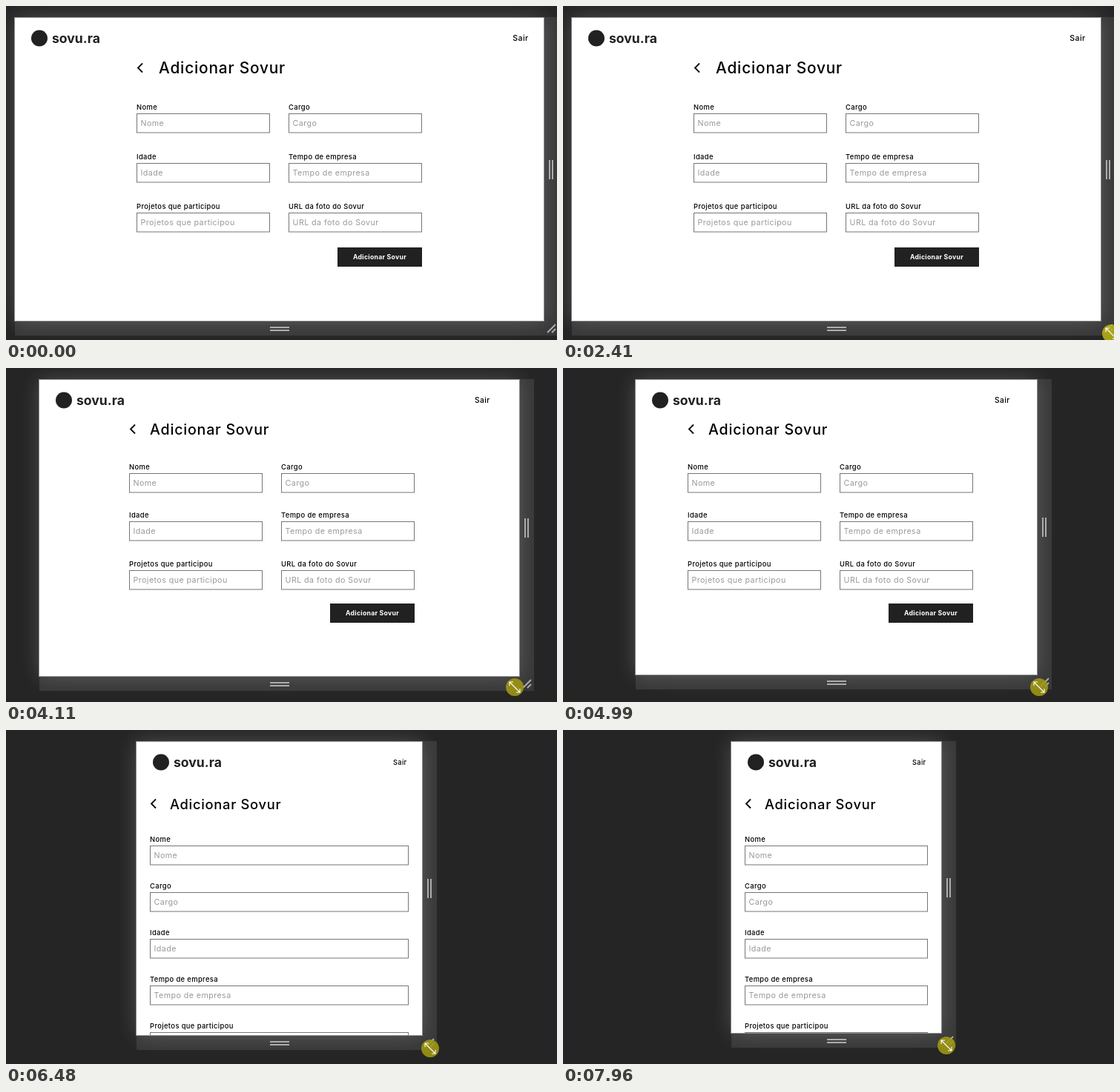
An HTML page that plays this animation: 743x451 px, repeating every 8 s.

```html
<!DOCTYPE html>
<html lang="pt-BR">
<head>
<meta charset="utf-8">
<title>Formulário responsivo</title>
<style>
  html, body { margin: 0; width: 100%; height: 100%; overflow: hidden; background: #252525; }
  #stage { position: relative; width: 743px; height: 451px; overflow: hidden; }
  #stage > * { position: absolute; }
  #page {
    top: 16px; background: #fff; overflow: hidden;
    box-shadow: 0 0 0 1px #8c8c8c, 0 0 26px rgba(255, 255, 255, .2);
  }
  #page svg { margin-top: -1px; }
  .bar { background: rgba(255, 255, 255, .085); }
  #right { top: 15px; width: 20px; }
  #bottom { height: 20px; }
  svg { display: block; overflow: visible; }
  #overlay { left: 0; top: 0; }
  text { font-family: Inter, "Open Sans", sans-serif; fill: #000; letter-spacing: .04em; }
  .brand { font-size: 17.6px; font-weight: 700; fill: #212121; letter-spacing: 0; }
  .title, .exit { font-weight: 500; }
  .label { font-size: 9.4px; font-weight: 500; }
  .hint { font-size: 10.7px; fill: #999; }
  .action { font-size: 8.7px; font-weight: 700; fill: #fff; text-anchor: middle; letter-spacing: .03em; }
  .box { fill: #fff; stroke: #767676; }
  .grip { stroke: #acacac; stroke-width: 2; fill: none; }
</style>
</head>
<body>
<div id="stage">
  <div id="right" class="bar"></div>
  <div id="bottom" class="bar"></div>
  <div id="page"></div>
  <svg id="overlay" width="743" height="451"></svg>
</div>
<script>
const LOOP = 8000, STEP = 78, CENTER = 368.5, TOP = 15;
const FORM = 385, FIELD = 180;

// time, page left, page bottom, pointer x, pointer y
const DRAG = [
  [2800, 12, 425, 739, 442],
  [3660, 25, 420, 714, 435],
  [4110, 45, 416, 686, 431],
  [4510, 77, 415, 663, 431],
  [4990, 98, 414, 642, 431],
  [5370, 124, 414, 616, 431],
  [5860, 149, 414, 590, 431],
  [6250, 170, 413, 578, 431],
  [7100, 205, 410, 544, 427],
  [7180, 205, 410, 544, 427],
  [7960, 227, 409, 517, 426]
];

// start time and pointer place before the drag; no place means hidden
const HOVER = [
  [0], [590, 742, 444], [680, 737, 437], [770],
  [1320, 749, 447], [1400, 745, 442], [1475, 743, 441], [1550],
  [2410, 739, 442]
];

const LAYOUTS = [
  { min: 666, scrollbar: 0, title: 20.8, base: 76, indent: 30, first: 130.5, pitch: 67, exit: 10.6 },
  { min: 600, scrollbar: 19, title: 19.6, base: 75, indent: 28, first: 127, pitch: 65.5, exit: 10.2 },
  { min: 499, scrollbar: 16, title: 19.6, base: 75, indent: 28, first: 127, pitch: 65.5, exit: 10.2 },
  { min: 416, scrollbar: 16, title: 18.3, base: 74, indent: 27, first: 122.9, pitch: 63, exit: 9.2 },
  { min: 0, scrollbar: 0, title: 18.3, base: 92, indent: 27, first: 141, pitch: 63, exit: 9.2, single: true }
];

const $ = id => document.getElementById(id);
const set = (el, attrs) => { for (const k in attrs) el.setAttribute(k, attrs[k]); };
function add(parent, tag, attrs, text) {
  const el = document.createElementNS('http://www.w3.org/2000/svg', tag);
  set(el, attrs);
  if (text) el.textContent = text;
  return parent.appendChild(el);
}
const move = (el, x, y) => el.setAttribute('transform', `translate(${x} ${y})`);

const view = add($('page'), 'svg', { width: 743, height: 451 });
add(view, 'circle', { cx: 33, cy: 28.5, r: 11, fill: '#212121' });
add(view, 'text', { class: 'brand', x: 50, y: 35 }, 'sovu.ra');
const exit = add(view, 'text', { class: 'exit', y: 32, 'text-anchor': 'end' }, 'Sair');
const back = add(view, 'path', { d: 'M8-6L2 0 8 6', fill: 'none', stroke: '#000', 'stroke-width': 1.8 });
const title = add(view, 'text', { class: 'title' }, 'Adicionar Sovur');

const fields = ['Nome', 'Cargo', 'Idade', 'Tempo de empresa', 'Projetos que participou', 'URL da foto do Sovur']
  .map(name => {
    const group = add(view, 'g', {});
    const box = add(group, 'rect', { class: 'box', x: .5, y: .5, height: 25.5 });
    add(group, 'text', { class: 'label', y: -4.6 }, name);
    add(group, 'text', { class: 'hint', x: 5.5, y: 16.6 }, name);
    return { group, box };
  });

const button = add(view, 'g', {});
add(button, 'rect', { width: 114, height: 26, fill: '#212121' });
add(button, 'text', { class: 'action', x: 57, y: 16.2 }, 'Adicionar Sovur');

const overlay = $('overlay');
const gripBottom = add(overlay, 'path', { class: 'grip', d: 'M-13 9h26M-13 13h26' });
const gripRight = add(overlay, 'path', { class: 'grip', d: 'M8-13v26M12-13v26' });
const gripCorner = add(overlay, 'path', { class: 'grip', d: 'M5 16L16 5M11 16l5-5' });
const pointer = add(overlay, 'g', {});
const halo = add(pointer, 'circle', { r: 12 });
add(pointer, 'path', {
  d: 'M-7-7L7 7M-7-2v-5h5M7 2v5H2', fill: 'none', stroke: '#fff', 'stroke-width': 1.1
});

function dragAt(t) {
  const next = DRAG.findIndex(key => key[0] > t);
  if (next === 0) return DRAG[0];
  if (next < 0) return DRAG[DRAG.length - 1];
  const a = DRAG[next - 1], b = DRAG[next];
  const steps = Math.max(1, Math.round((b[0] - a[0]) / STEP));
  const p = Math.floor((t - a[0]) / (b[0] - a[0]) * steps) / steps;
  return a.map((v, i) => v + (b[i] - v) * p);
}

function layOut(width) {
  const o = LAYOUTS.find(l => width >= l.min);
  const form = o.single ? width - 36 : FORM;
  const left = Math.floor((width - o.scrollbar - form) / 2);
  const fieldWidth = o.single ? form : FIELD;

  set(exit, { x: width - o.scrollbar - 20.5, 'font-size': o.exit });
  set(title, { x: left + o.indent, y: o.base, 'font-size': o.title });
  move(back, left, o.base - 7.5);
  fields.forEach(({ group, box }, i) => {
    const row = o.single ? i : i >> 1;
    const x = o.single || i % 2 === 0 ? left : left + form - fieldWidth;
    move(group, x, Math.floor(o.first + row * o.pitch));
    box.setAttribute('width', fieldWidth - 1);
  });
  const lastRow = o.single ? 5 : 2;
  move(button, left + form - 114, Math.floor(o.first + (lastRow + .7) * o.pitch));
}

function render(t) {
  const [, leftRaw, bottomRaw, dragX, dragY] = dragAt(t);
  const left = Math.round(leftRaw), bottom = Math.round(bottomRaw);
  const right = CENTER * 2 - left, width = right - left;

  Object.assign($('page').style, { left: left + 'px', width: width + 'px', height: bottom - TOP - 1 + 'px' });
  Object.assign($('right').style, { left: right + 'px', height: bottom - TOP + 'px' });
  Object.assign($('bottom').style, { left: left + 'px', top: bottom + 'px', width: width + 20 + 'px' });
  layOut(width);

  move(gripBottom, CENTER + .5, bottom);
  move(gripRight, right, Math.floor((TOP + bottom) / 2) + 1);
  move(gripCorner, right, bottom);

  const dragging = t >= DRAG[0][0];
  const [, x, y] = dragging ? [0, dragX, dragY] : HOVER.findLast(key => key[0] <= t);
  pointer.style.display = x ? '' : 'none';
  if (x) move(pointer, Math.round(x), Math.round(y));
  halo.setAttribute('fill', dragging ? 'rgba(160,152,18,.88)' : 'rgba(184,176,24,.88)');
}

const start = performance.now();
function tick() {
  render((performance.now() - start) % LOOP);
  requestAnimationFrame(tick);
}
tick();
</script>
</body>
</html>
```
